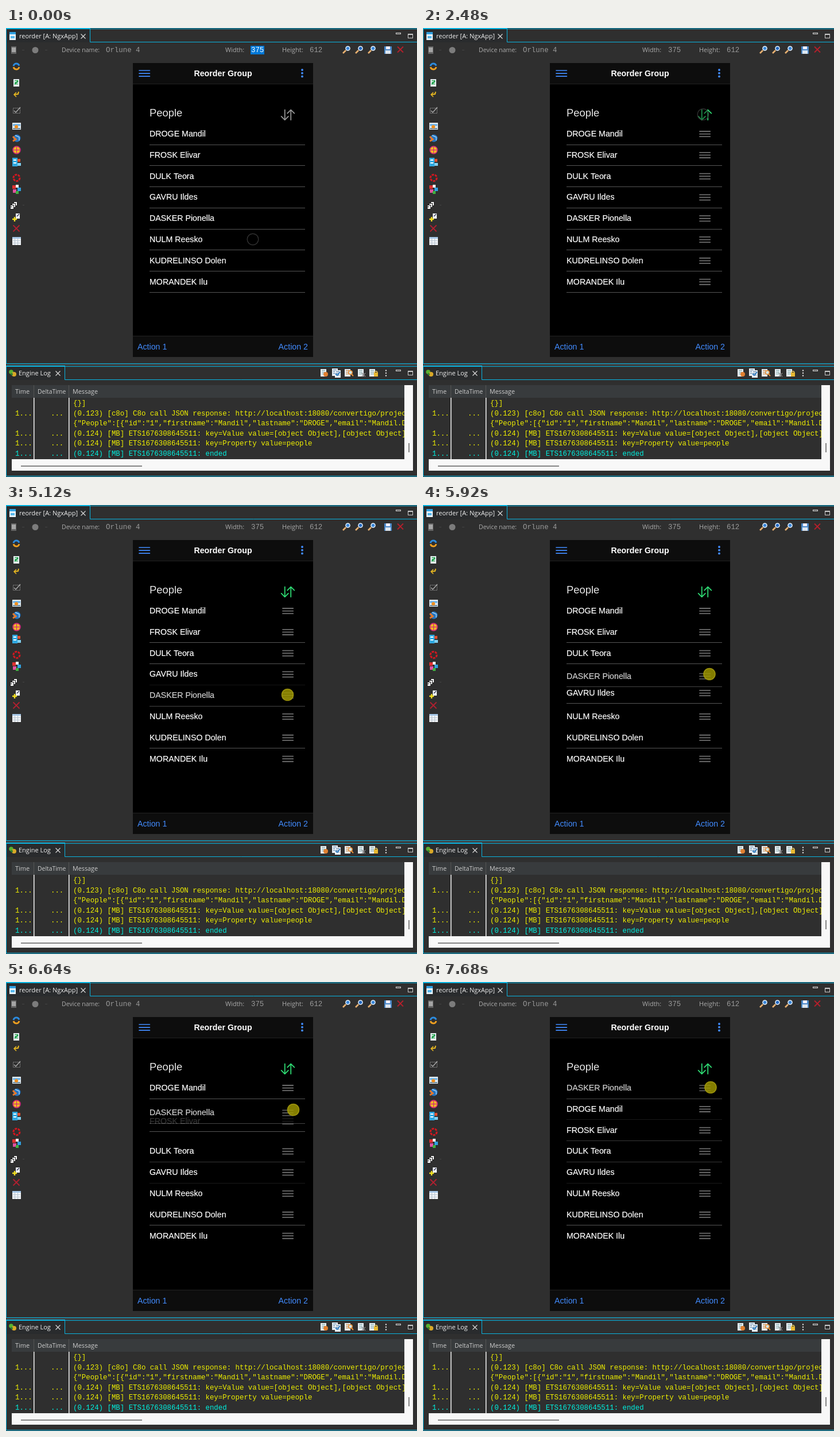
These frames come from a looping animation (716 px wide and 782 px high, 8 s). An HTML page with a canvas:

```html
<!DOCTYPE html>
<html lang="en">
<head>
<meta charset="utf-8">
<title>Reorder list</title>
<style>
html, body { margin: 0; width: 100%; height: 100%; overflow: hidden; background: #2f2f2f; }
canvas { display: block; }
</style>
</head>
<body>
<canvas id="stage" width="716" height="782"></canvas>
<script>
const ctx = document.getElementById('stage').getContext('2d');
const UI = '11px "Open Sans", sans-serif';
const MONO = '12.4px "Liberation Mono", monospace';
const APP = '14.23px "Liberation Sans", sans-serif';
const CYAN = '#0ab4e0', BLUE = '#428cff', GREEN = '#2fdf75', YELLOW = '#f0f000', SCROLLBAR = '#f8f8f8';

const PEOPLE = ['DROGE Mandil', 'FROSK Elivar', 'DULK Teora', 'GAVRU Ildes',
  'DASKER Pionella', 'NULM Reesko', 'KUDRELINSO Dolen', 'MORANDEK Ilu'];
const ROW = 36.79, DRAGGED = 4, LOOP = 8000, STEP = 80;
const PRESS = 4880, DRAG = 4960, TOGGLE = 2240;
const SWAP = [6990, 6540, 6130, 5740];       // when each row above gives way
const LINE_BEFORE = [0, 1, 1, .7, 1, 0, 1, 0]; // separator strength during the drag
const LINE_AFTER = [.3, .65, .65, .3];

// Pointer path: time, x, y
const PATH = [
  [160, 430, 368], [320, 426, 362], [560, 415, 322], [720, 413.5, 287], [880, 420, 253],
  [1040, 434.5, 225.5], [1360, 466, 184], [1600, 480, 162], [1920, 488, 150.5],
  [2960, 488, 150.5], [3200, 493, 184], [3520, 495, 247], [3840, 490, 302], [4000, 488, 319],
  [4240, 490, 329.5], [4320, 490, 329.5], [4480, 490.5, 330.5], [5360, 490.5, 330.5],
  [5680, 496, 319], [5800, 498, 302], [5920, 499, 294.5], [6240, 500, 265], [6640, 500.5, 222.5],
  [7120, 501, 191], [7360, 501, 166], [7600, 501, 183.5], [LOOP, 501, 183.5]];

function pointer(t) {
  if (t <= PATH[0][0]) return PATH[0].slice(1);
  const i = PATH.findIndex(p => p[0] >= t), [t0, x0, y0] = PATH[i - 1], [t1, x1, y1] = PATH[i];
  const k = (t - t0) / (t1 - t0);
  return [x0 + (x1 - x0) * k, y0 + (y1 - y0) * k];
}

// The CSS "ease" curve
function ease(x) {
  if (x <= 0) return 0;
  if (x >= 1) return 1;
  let lo = 0, hi = 1, m;
  for (let i = 0; i < 20; i++) {
    m = (lo + hi) / 2;
    if (.75 * m * (1 - m) + m ** 3 < x) lo = m; else hi = m;
  }
  return .3 * (1 - m) ** 2 * m + 3 * (1 - m) * m * m + m ** 3;
}

function rect(x, y, w, h, color) { ctx.fillStyle = color; ctx.fillRect(x, y, w, h); }
function frame(x, y, w, h, color) { ctx.strokeStyle = color; ctx.lineWidth = 1; ctx.strokeRect(x + .5, y + .5, w, h); }
function text(str, x, y, font, color, align = 'left') {
  ctx.font = font; ctx.fillStyle = color; ctx.textAlign = align; ctx.fillText(str, x, y);
}
function line(color, width, ...pts) {
  ctx.strokeStyle = color; ctx.lineWidth = width;
  ctx.beginPath();
  for (let i = 0; i < pts.length; i += 2) ctx.lineTo(pts[i], pts[i + 1]);
  ctx.stroke();
}
function disc(x, y, r, color) { ctx.fillStyle = color; ctx.beginPath(); ctx.arc(x, y, r, 0, 7); ctx.fill(); }
function arc(x, y, r, a, b, color, width) {
  ctx.strokeStyle = color; ctx.lineWidth = width;
  ctx.beginPath(); ctx.arc(x, y, r, a, b); ctx.stroke();
}
function cross(x, y, r, color, width) {
  line(color, width, x - r, y - r, x + r, y + r);
  line(color, width, x - r, y + r, x + r, y - r);
}
function bars(x, ys, w, color, width) { for (const y of ys) line(color, width, x, y, x + w, y); }
function dots(x, ys, r, color) { for (const y of ys) disc(x, y, r, color); }
function rounded(paint) {
  ctx.save();
  ctx.lineCap = ctx.lineJoin = 'round';
  paint();
  ctx.restore();
}
function page(x, y, color) {
  rect(x - 5, y - 6, 10, 13, '#e8eef4');
  bars(x - 3, [y - 3.5, y - .5, y + 2.5], 6, color, 1.2);
}
function magnifier(x, y, color) {
  line('#e8b070', 2.6, x - 6, y + 6, x - 1, y + 1);
  disc(x + 2.5, y - 2.5, 4.3, '#e4f2ff');
  disc(x + 2.5, y - 2.5, 2.8, color);
}
function windowButtons(y) {
  frame(679, y - 2, 8, 2, '#ccc');
  frame(700, y, 8, 7, '#ccc'); rect(700, y + 1, 9, 1, '#ccc');
}

function topToolbar(widthSelected) {
  ctx.globalAlpha = .75;
  rect(9, 32, 9, 13, '#777'); rect(10, 34, 7, 8, '#bbb');
  ctx.globalAlpha = 1;
  disc(51, 38.5, 5.5, '#7c7c7c');
  rect(28, 38, 4, 1, '#444'); rect(68, 38, 4, 1, '#444');
  text('Device name:', 97, 42, '10.6px "Open Sans", sans-serif', '#aaa');
  text('Orlune 4', 174, 42, MONO, '#999');
  text('Width:', 382, 42, UI, '#aaa');
  if (widthSelected) rect(426, 31, 24, 15, '#0078d7');
  text('375', 427, 42, MONO, widthSelected ? '#fff' : '#999');
  text('Height:', 481, 42, UI, '#aaa');
  text('612', 529, 42, MONO, '#999');
  magnifier(593, 38, '#3a86d8'); magnifier(615, 38, '#2468c0'); magnifier(637, 38, '#3a86d8');
  rect(659, 32, 13, 13, '#4a88c8'); rect(662, 32, 7, 5, '#eef'); rect(661, 39, 9, 6, '#dde6f0');
  cross(687, 37.5, 5, '#b5202c', 1.8);
}

function sideIcons() {
  arc(18, 67, 5, 3.3, 6, '#2c8ce0', 3); arc(18, 67, 5, .2, 2.9, '#f0a020', 3);
  page(18, 95, '#20a040'); line('#18a048', 2, 15, 98, 21, 92);
  line('#e8b820', 2, 22, 111, 21, 115, 15, 116); line('#e8b820', 1.5, 18, 112, 14, 116, 18, 120);
  ctx.setLineDash([2, 1]); frame(12, 139, 12, 9, '#888'); ctx.setLineDash([]);
  line('#aaa', 1.4, 14, 144, 17, 147, 25, 138);
  rect(11, 165, 15, 12, '#e8f0f4'); rect(12, 167, 13, 4, '#7ab8e8'); rect(12, 174, 13, 2, '#6888a0'); disc(18, 172, 3, '#f09020');
  disc(19, 192, 6.5, '#2474c0'); line('#e87828', 3, 12, 189, 17, 194, 12, 197); line('#9fd0f4', 1.4, 16, 187, 23, 190, 23, 196);
  disc(18.5, 212.5, 6.5, '#f0c020'); arc(18.5, 212.5, 6.5, 0, 7, '#d02878', 1.6);
  line('#d02878', 1.3, 18.5, 206, 18.5, 219); line('#d02878', 1.3, 12, 212.5, 25, 212.5);
  rect(11, 226, 9, 15, '#30a8e0'); rect(13, 229, 5, 2, '#fff'); rect(13, 234, 5, 2, '#fff');
  rect(20, 228, 5, 5, '#e05030'); rect(20, 235, 6, 5, '#80d0f0');
  ctx.setLineDash([4, 1.5]); arc(18.5, 261, 5.5, 0, 6.2, '#d01820', 3); ctx.setLineDash([]);
  rect(11, 274, 6, 6, '#e03030'); rect(17, 273, 5, 5, '#f0f0f0'); rect(12, 281, 6, 6, '#e050a0');
  rect(20, 278, 6, 6, '#30a0e0'); rect(17, 284, 5, 5, '#40b040');
  for (let i = 2; i >= 0; i--) { rect(7 + i * 3, 308 - i * 3, 7, 8, '#f4f4f4'); frame(7 + i * 3, 308 - i * 3, 6, 7, '#222'); }
  rect(8, 311, 3, 1, '#333'); rect(29, 308, 3, 1, '#444');
  rect(17, 323, 7, 9, '#f0f4f8'); line('#335', 1.5, 19, 328, 23, 324);
  line('#f4e020', 2.4, 15, 329, 15, 337); line('#f4e020', 2.4, 11, 333, 19, 333);
  cross(18, 349, 5.5, '#b02030', 1.8);
  rect(11, 364, 15, 14, '#f2f5f8'); rect(11, 364, 15, 3, '#a8c8e8');
  bars(12, [370.5, 374.5], 13, '#b8c4d0', 1);
  for (const x of [15.5, 20.5]) line('#b8c4d0', 1, x, 367, x, 378);
}

// Outline of a view whose right edge lies beyond the stage, with its selected tab
function viewFrame(top, bottom, tabWidth) {
  frame(0, top, 720, bottom - top, CYAN);
  rect(1, top + 1, tabWidth - 1, 23, '#292b2d');
  line(CYAN, 1, tabWidth + .5, top, tabWidth + .5, top + 23.5, 716, top + 23.5);
  rect(0, top - 1, tabWidth + 1, 1, CYAN);
}

function editorView(widthSelected) {
  viewFrame(1, 584, 146);
  rect(6, 7, 11, 14, '#e8f4fc'); rect(6, 7, 11, 4, '#30a0e0'); rect(8, 14, 7, 4, '#58b8ec');
  text('reorder [A: NgxApp]', 23, 18, UI, '#eee');
  cross(134.5, 14.5, 4, '#ddd', 1.1);
  windowButtons(10);
  topToolbar(widthSelected);
  sideIcons();
}

function logView() {
  rect(0, 585, 716, 3, '#3f4345');
  viewFrame(589, 780, 102);
  disc(9, 599, 3.8, '#58b030'); disc(14, 603, 4, '#d8a828'); disc(10, 603, 2, '#308030');
  text('Engine Log', 22, 605, UI, '#eee');
  cross(90.5, 601.5, 4, '#ddd', 1.1);
  windowButtons(597);
  page(553, 600, '#8aa'); disc(557, 603, 4, '#e08030');
  page(573, 599, '#68a'); page(578, 602, '#68a'); line('#2878c0', 1.8, 574, 602, 577, 605, 582, 599);
  page(595, 600, '#c84'); disc(600, 600, 4, '#e8923a'); disc(600, 600, 2.4, '#cde8ff'); line('#e8923a', 2, 602, 603, 605, 606);
  page(618, 600, '#8aa'); cross(623, 604, 3, '#888', 1.5);
  page(638, 600, '#8aa'); rect(641, 600, 7, 7, '#e8b830'); arc(644.5, 600, 2.3, 3.14, 6.28, '#e8c860', 1.4);
  dots(662, [596.5, 601, 605.5], 1.2, '#ddd');

  rect(10, 622, 684, 22, '#383b3d');
  text('Time', 16, 637, UI, '#ccc');
  text('DeltaTime', 55, 637, '10.4px "Open Sans", sans-serif', '#ccc');
  text('Message', 116, 637, '10.8px "Open Sans", sans-serif', '#ccc');
  for (const x of [48, 109]) { rect(x, 622, 1, 22, '#555'); rect(x, 644, 1.5, 107, '#f4f4f4'); }

  const entries = [
    ['{}]'],
    ['(0.123) [c8o] C8o call JSON response: http://localhost:18080/convertigo/projects', 1],
    ['{"People":[{"id":"1","firstname":"Mandil","lastname":"DROGE","email":"Mandil.D'],
    ['(0.124) [MB] ETS1676308645511: key=Value value=[object Object],[object Object]', 1],
    ['(0.124) [MB] ETS1676308645511: key=Property value=people', 1],
    ['(0.124) [MB] ETS1676308645511: ended', 1]];
  ctx.save();
  ctx.beginPath(); ctx.rect(10, 644, 684, 107); ctx.clip();
  entries.forEach(([message, stamped], i) => {
    const y = Math.round(657 + i * 17.6), color = i === 5 ? '#00f0e0' : YELLOW;
    text(message, 117, y, MONO, color);
    if (stamped) { text('1...', 16, y, MONO, color); text('...', 78, y, MONO, color); }
  });
  ctx.restore();
  rect(694, 622, 15, 149, SCROLLBAR);
  rect(10, 751, 699, 20, SCROLLBAR);
  rect(26, 762, 211, 2, '#858585');
  rect(701, 723, 2, 16, '#858585');
}

// Opposed arrows on a 512 unit grid
function reorderIcon(color) {
  rounded(() => {
    ctx.translate(477, 137.3);
    ctx.scale(28 / 512, 28 / 512);
    line(color, 32, 48, 304, 160, 416, 272, 304);
    line(color, 32, 160, 398, 160, 96);
    line(color, 32, 464, 208, 352, 96, 240, 208);
    line(color, 32, 352, 114, 352, 416);
  });
}

function phone(iconGreen) {
  rect(221, 61, 314, 512, '#000');
  rect(221, 61, 314, 36, '#0d0d0d'); rect(221, 97, 314, 1, '#222');
  rect(221, 537, 314, 36, '#0d0d0d'); rect(221, 536, 314, 1, '#222');
  rounded(() => bars(232, [74, 79.1, 84.2], 18.4, BLUE, 1.67));
  dots(516, [73, 78.7, 84.4], 1.9, BLUE);
  text('Reorder Group', 378, 84, 'bold ' + APP, '#fff', 'center');
  text('Action 1', 229, 560, APP, BLUE);
  text('Action 2', 526, 560, APP, BLUE, 'right');
  text('People', 250, 154, '18.42px "Liberation Sans", sans-serif', '#e6e6e6');
  reorderIcon(iconGreen ? GREEN : '#999');
}

function row(i, offset, handles, lineAlpha) {
  const y = i * ROW + offset, baseline = Math.round(189 + y);
  text(PEOPLE[i], 250, baseline, APP, '#fff');
  // A hairline outline gives the names their slightly heavier weight.
  ctx.strokeStyle = '#fff'; ctx.lineWidth = .2;
  ctx.strokeText(PEOPLE[i], 250, baseline);
  if (handles) rounded(() => bars(482, [180, 184.6, 189.2].map(v => v + y), 18.2, '#6c6c6c', 1.8));
  const alpha = ctx.globalAlpha;
  ctx.globalAlpha *= lineAlpha;
  rect(250, Math.round(202.5 + y), 271, 1, '#555');
  ctx.globalAlpha = alpha;
}

function separator(i, t) {
  if (t < DRAG) return 1;
  if (i >= DRAGGED || t < SWAP[i]) return i === 0 && t >= SWAP[1] ? 1 : LINE_BEFORE[i];
  return t < SWAP[i] + 300 ? 1 : LINE_AFTER[i];
}

function list(t) {
  const handles = t >= TOGGLE, dragging = t >= DRAG;
  PEOPLE.forEach((_, i) => {
    if (i === DRAGGED && dragging) return;
    const shift = i < DRAGGED ? ROW * ease((t - SWAP[i]) / 300) : 0;
    row(i, shift, handles, separator(i, t));
  });
  if (!dragging) return;
  // The dragged row trails the pointer slightly and half hides what is below it.
  const offset = pointer(t - 40)[1] - 330.5;
  ctx.globalAlpha = .8;
  rect(250, 166 + DRAGGED * ROW + offset, 271, ROW, '#000');
  row(DRAGGED, offset, true, 1);
  ctx.globalAlpha = 1;
}

function drawPointer(t) {
  const [x, y] = pointer(t);
  const pressed = t >= PRESS || (t >= 2080 && t < TOGGLE);
  disc(x, y, pressed ? 10.8 : 10, pressed ? 'rgba(160,152,0,.82)' : 'rgba(0,0,0,.35)');
  arc(x, y, 9.8, 0, 7, pressed ? 'rgba(165,155,20,.7)' : 'rgba(58,58,58,.85)', 1.4);
}

function draw(now) {
  const t = Math.floor(now % LOOP / STEP) * STEP;
  rect(0, 0, 716, 782, '#2f2f2f');
  editorView(t < 2080);
  logView();
  phone(t >= 2480);
  list(t);
  drawPointer(t);
}

const start = performance.now();
function tick() {
  draw(performance.now() - start);
  requestAnimationFrame(tick);
}
tick();
</script>
</body>
</html>
```
